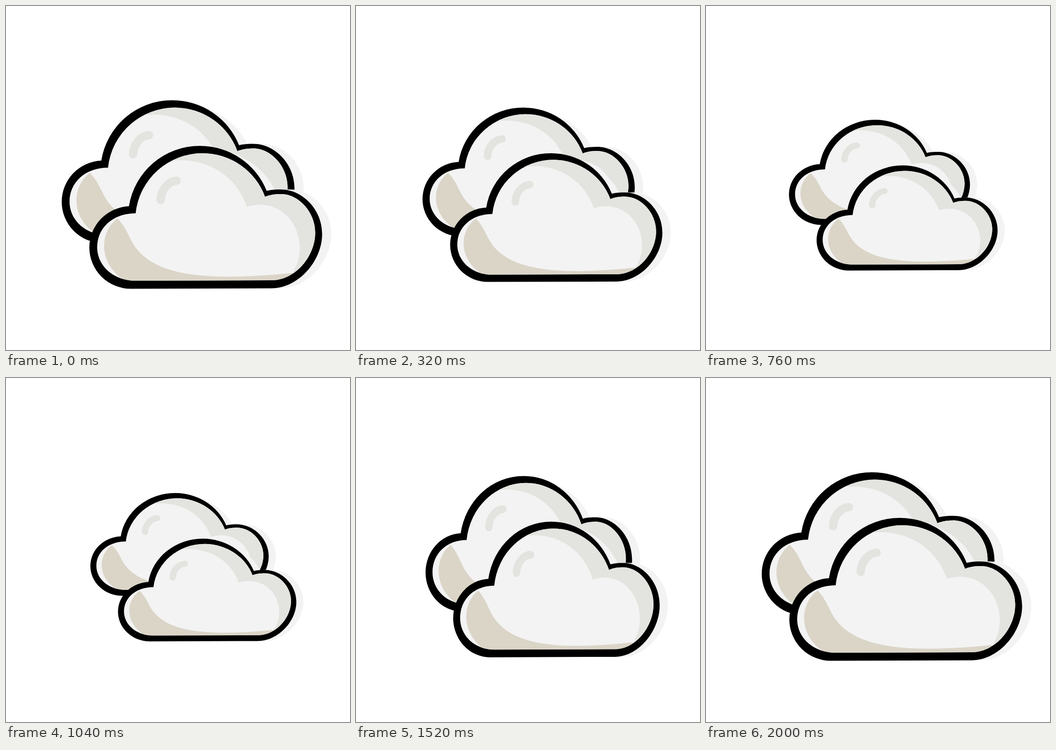
Write an HTML page that moves like this. It is 747x750 px and loops after 2.04 s.

```html
<!DOCTYPE html>
<html lang="en">
<head>
<meta charset="utf-8">
<title>Clouds</title>
<style>
  html, body { margin: 0; width: 100%; height: 100%; overflow: hidden; background: #fff; }
  svg { display: block; width: 747px; height: 750px; }
</style>
</head>
<body>
<svg viewBox="0 0 747 750">
  <defs>
    <path id="body" d="M281 599C234 599 198 567 198 526C198 484 232 452 281.5 452A146 146 0 0 1 427 321A144.5 144.5 0 0 1 562.5 416C574 411 586 410 597 410C636 410 671.5 450 671.5 494C671.5 546 628 598 577 598Z"/>
    <clipPath id="inside"><use href="#body"/></clipPath>
    <g id="cloud">
      <path fill="#f3f3f3" d="M460 312C515 322 562 355 584 401C596 400 606 400 617 400C663 400 706.5 443 706.5 497C706.5 555 656 615 597 615.5H460Z"/>
      <path d="M271 616.5A90 90 0 0 1 181 526A90 90 0 0 1 267 436.5A155.5 155.5 0 0 1 421 305A155.5 155.5 0 0 1 566 403C576 400.5 586 400 597 400C643 400 686.5 443 686.5 497C686.5 555 636 615 577 615.5Z"/>
      <use href="#body" fill="#f3f3f3"/>
      <g clip-path="url(#inside)">
        <path fill="#e3e3df" d="M362 337C440 330 501 372 523 438C585 418 638 465 638 528C638 548 632 567 622 582L700 560V300H362Z"/>
        <path fill="#dbd5c8" d="M242 463C270 492 266 518 301 547C365 600 500 594 622 582L600 610H285C245 599 213 565 213 523C213 500 223 478 242 463Z"/>
      </g>
      <path d="M370.5 381C352 382 336 402 336 423" fill="none" stroke="#e3e3df" stroke-width="18" stroke-linecap="round"/>
    </g>
  </defs>
  <g class="squash" data-x="387" data-y="366.5"><use href="#cloud" x="-447" y="-466"/></g>
  <g class="squash" data-x="447" data-y="466"><use href="#cloud" x="-447" y="-466"/></g>
</svg>
<script>
const LOOP = 2040, STEP = 40;
const clouds = document.querySelectorAll('.squash');

// Ease with horizontal handles a and b, solved by bisection.
function ease(u, a, b) {
  let lo = 0, hi = 1;
  for (let i = 0; i < 24; i++) {
    const s = (lo + hi) / 2, r = 1 - s;
    if (3 * r * r * s * a + 3 * r * s * s * b + s ** 3 < u) lo = s;
    else hi = s;
  }
  return lo * lo * (3 - 2 * lo);
}

// Each key: end time, end value, ease handles.
const scaleX = [[1020, .766, .379, .263], [2000, 1, .42, .58]];
const scaleY = [[1020, .718, .349, .345], [1760, 1.017, .4, .6], [2000, 1, .4, .6]];

function valueAt(keys, t) {
  let start = 0, from = 1;
  for (const [end, to, a, b] of keys) {
    if (t < end) return from + (to - from) * ease((t - start) / (end - start), a, b);
    start = end;
    from = to;
  }
  return from;
}

function draw(now) {
  const t = Math.floor(now % LOOP / STEP) * STEP;
  const scale = `scale(${valueAt(scaleX, t)} ${valueAt(scaleY, t)})`;
  for (const c of clouds)
    c.setAttribute('transform', `translate(${c.dataset.x} ${c.dataset.y}) ${scale}`);
}

let origin;
function frame(now) {
  origin ??= now;
  draw(now - origin);
  requestAnimationFrame(frame);
}
draw(0);
requestAnimationFrame(frame);
</script>
</body>
</html>
```
